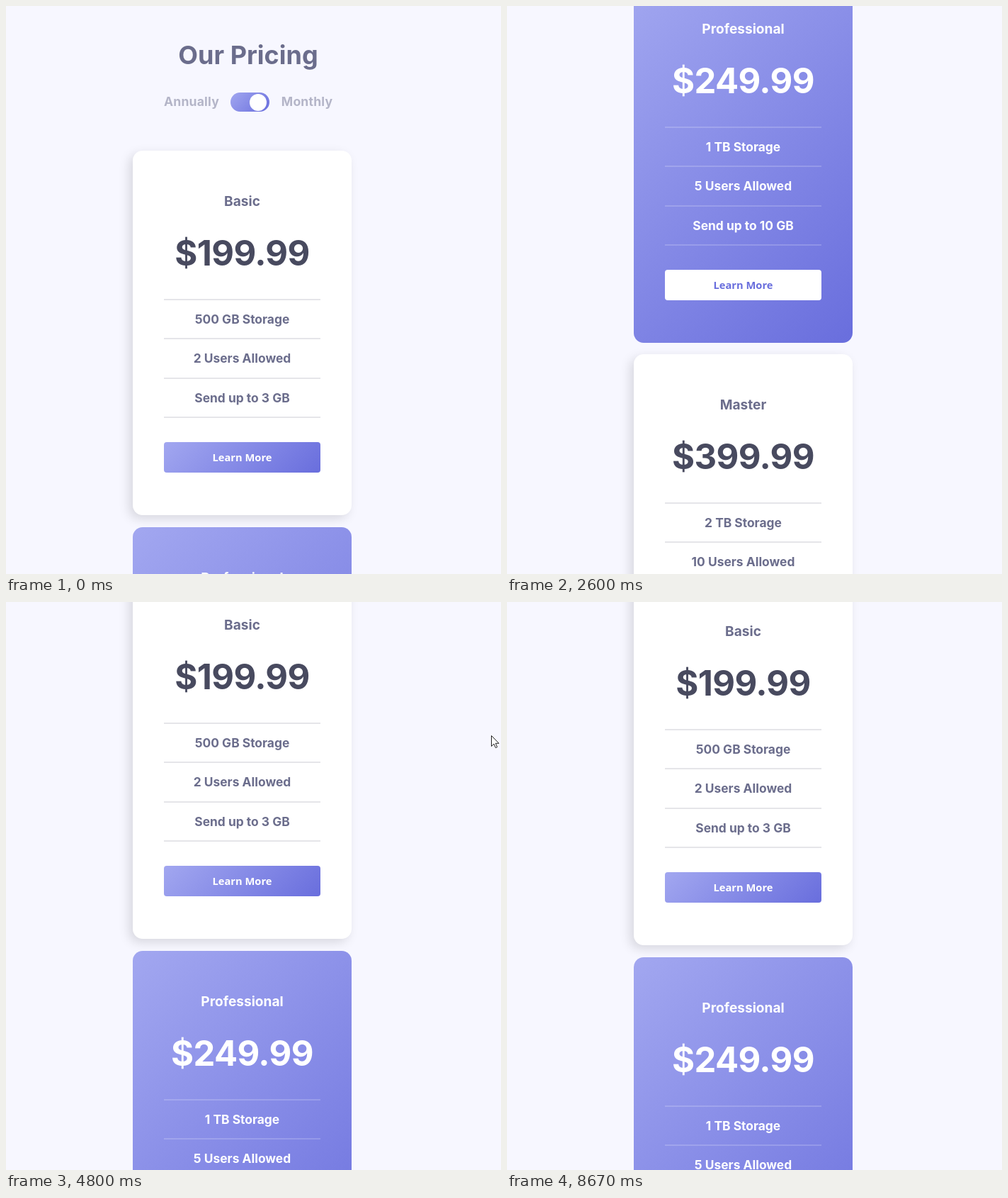
An HTML page that plays this animation: 699 by 801 pixels, repeating every 9190 ms.

```html
<!DOCTYPE html>
<html lang="en">
<head>
<meta charset="utf-8">
<title>Pricing</title>
<style>
  html, body { margin: 0; width: 100%; height: 100%; overflow: hidden; background: #f7f7ff; }
  #stage { position: relative; width: 699px; height: 801px; overflow: hidden; font: 700 17.4px/40px Inter, sans-serif; color: #6b6d8c; }
  #stage * { position: absolute; box-sizing: border-box; margin: 0; text-align: center; white-space: nowrap; }
  #page { inset: 0; }
  h1 { left: 192px; top: 49px; width: 300px; font-size: 36px; }
  .label { top: 115px; width: 120px; font-size: 17.6px; letter-spacing: .01em; color: #b4b5c8; }
  .toggle { left: 317px; top: 122px; width: 55px; height: 27px; border-radius: 14px; }
  #knob { top: 1.5px; width: 24px; height: 24px; border-radius: 50%; background: #fff; }
  .card { left: 179px; width: 309px; height: 514px; border-radius: 14px; background: #fff; box-shadow: -5px 5px 15px rgba(0, 0, 0, .13); }
  .card p { left: 0; width: 100%; }
  .card .name { top: 51px; font-size: 19.1px; }
  .card .price { top: 125px; font-size: 49px; letter-spacing: -.012em; color: #484a5f; }
  .card i { left: 44px; width: 221px; height: 2px; background: #e5e5e9; }
  .card b { left: 44px; top: 411px; width: 221px; height: 43px; border-radius: 4px; color: #fff; font: 700 14.7px/43px "Open Sans", "Noto Sans", sans-serif; }
  .toggle, .card b, .card.pro { background: linear-gradient(135deg, #a2a7f0, #696edd); }
  .card.pro, .card.pro .price { color: #fff; }
  .card.pro { box-shadow: none; }
  .card.pro i { background: rgba(255, 255, 255, .18); }
  .card.pro b { background: #fff; color: #696edd; }
  #cursor { left: 0; top: 0; overflow: visible; }
</style>
</head>
<body>
<div id="stage">
  <div id="page">
    <h1>Our Pricing</h1>
    <p class="label" style="left:202px">Annually</p>
    <div class="toggle"><div id="knob"></div></div>
    <p class="label" style="left:365px">Monthly</p>
  </div>
  <svg id="cursor" width="13" height="20">
    <path d="M.5 .5V15.5L4 12.2L6.4 17.6L8.7 16.6L6.3 11.3H11Z" fill="#fff" stroke="#222"/>
  </svg>
</div>
<script>
const LOOP = 9190, TICK = 1000 / 15;
const $ = id => document.getElementById(id);

const plans = [
  { name: 'Basic', top: 204, prices: ['$199.99', '$19.99'], rows: ['500 GB Storage', '2 Users Allowed', 'Send up to 3 GB'] },
  { name: 'Professional', top: 735, prices: ['$249.99', '$24.99'], rows: ['1 TB Storage', '5 Users Allowed', 'Send up to 10 GB'], type: 'pro' },
  { name: 'Master', top: 1265, prices: ['$399.99', '$39.99'], rows: ['2 TB Storage', '10 Users Allowed', 'Send up to 20 GB'] }
];
const lineY = [209, 264, 320, 375];

$('page').insertAdjacentHTML('beforeend', plans.map(p => `
  <div class="card ${p.type || ''}" style="top:${p.top}px">
    <p class="name">${p.name}</p>
    <p class="price"></p>
    ${lineY.map(y => `<i style="top:${y}px"></i>`).join('')}
    ${p.rows.map((r, i) => `<p style="top:${lineY[i] + 9}px">${r}</p>`).join('')}
    <b>Learn More</b>
  </div>`).join(''));
const priceTags = document.querySelectorAll('.price');

// Keys are [time, value]
const scrollKeys = [
  [734, 0], [1067, 187], [1400, 428], [1733, 646], [2200, 704], [2400, 704], [2600, 774], [2860, 920], [3133, 985],
  [4067, 985], [4400, 768], [4700, 385], [5000, 31], [5333, 0], [7334, 0], [7600, 135], [7900, 234]
];
const cursorX = [[4550, 705], [5000, 666], [5333, 657], [5400, 657], [5640, 545], [5933, 345], [7800, 345], [8067, 265], [8267, 195], [8667, 85]];
const cursorY = [[4550, 215], [5000, 160], [5333, 141], [5400, 141], [5640, 166], [5933, 139], [7800, 139], [8067, 480], [8267, 718], [8667, 804]];

// Monotone cubic interpolation: smooth, without overshoot
function sample(keys, t) {
  const last = keys.length - 1;
  if (t <= keys[0][0]) return keys[0][1];
  if (t >= keys[last][0]) return keys[last][1];
  const slope = i => i < 0 || i >= last ? 0 : (keys[i + 1][1] - keys[i][1]) / (keys[i + 1][0] - keys[i][0]);
  const tangent = i => {
    const a = slope(i - 1), b = slope(i);
    return a * b > 0 ? 2 * a * b / (a + b) : 0;
  };
  const i = keys.findIndex(k => k[0] > t) - 1;
  const [t0, v0] = keys[i], [t1, v1] = keys[i + 1];
  const d = t1 - t0, u = (t - t0) / d, w = 1 - u;
  return v0 * w * w * (1 + 2 * u) + v1 * u * u * (3 - 2 * u) + d * u * w * (tangent(i) * w - tangent(i + 1) * u);
}

function draw(now) {
  const t = Math.floor((now % LOOP + 4) / TICK) * TICK;
  const flipped = t > 6260 && t < 7060;
  $('page').style.transform = `translateY(${-Math.round(sample(scrollKeys, t))}px)`;
  $('knob').style.left = (flipped ? 4 : 26.5) + 'px';
  priceTags.forEach((tag, i) => tag.textContent = plans[i].prices[+flipped]);
  $('cursor').style.transform = `translate(${Math.round(sample(cursorX, t))}px, ${Math.round(sample(cursorY, t))}px)`;
}

const start = performance.now();
function frame() {
  draw(performance.now() - start);
  requestAnimationFrame(frame);
}
frame();
</script>
</body>
</html>
```
